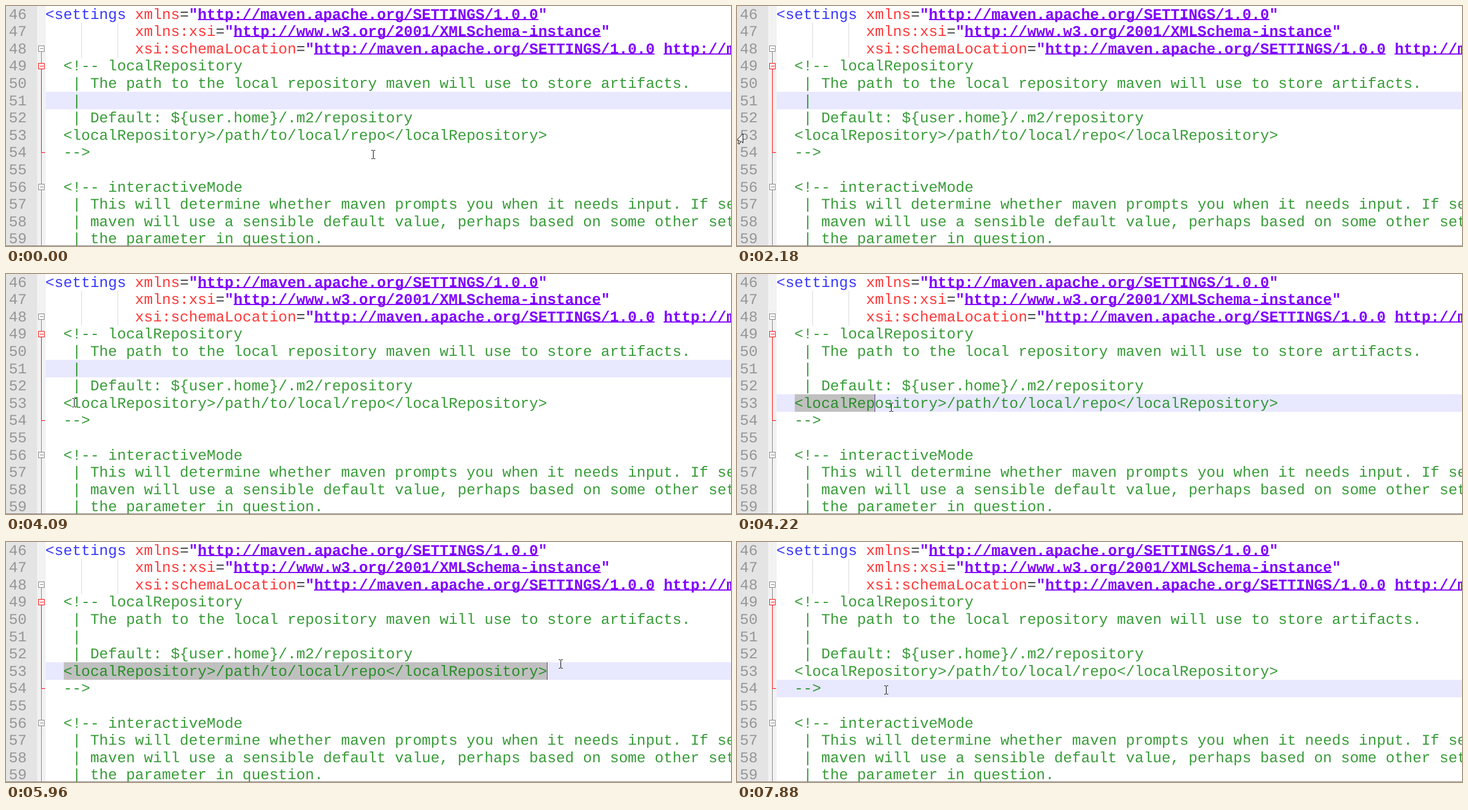
An HTML page for the animation above (8 s loop, 1280 by 425 pixels).

```html
<!DOCTYPE html>
<html lang="en">
<head>
<meta charset="utf-8">
<title>settings.xml</title>
<style>
html, body { margin: 0; width: 100%; height: 100%; overflow: hidden; background: #fff; }
svg { display: block; width: 100%; height: 100%; }
text {
  font: 26.36px "Courier New", "Liberation Mono", monospace;
  white-space: pre;
  text-rendering: geometricPrecision;
  fill-opacity: .78;
}
.num { fill: #808080; }
.tag { fill: #0000ff; }
.attr { fill: #ff0000; }
.op { fill: #000; }
.note { fill: #008000; }
.str, .url { fill: #8000ff; font-weight: bold; fill-opacity: 1; }
rect, .fold { shape-rendering: crispEdges; }
</style>
</head>
<body>
<svg id="stage" viewBox="0 0 1280 425" preserveAspectRatio="none">
  <rect width="1280" height="425" fill="#fff"/>
  <rect width="55" height="425" fill="#e4e4e4"/>
  <rect x="55" width="15" height="425" fill="#f2f2f2"/>
  <rect id="row" x="70" width="1210" height="31" fill="#e8e8ff"/>
  <rect id="sel" x="102" y="213" height="31" fill="#c0c0c0"/>
  <g id="code"></g>
  <rect id="caret" width="1" height="31" fill="#5a28a0"/>
  <rect y="424" width="1280" height="1" fill="#808080"/>
  <path id="beam" fill="none" stroke="#000" d="M-3.5-7.5H-1L0-6.5L1-7.5H3.5M0-7V7M-3.5 7.5H-1L0 6.5L1 7.5H3.5"/>
  <path id="arrow" fill="#fff" stroke="#000" stroke-linejoin="round" d="M0 0V16.5L-3.8 13L-6.4 18.5L-8.8 17.5L-6.4 12H-11.5Z"/>
</svg>
<script>
const LOOP = 8000, X0 = 69.6, STEP = 15.82, TOP = -1, ROW = 30.6, FIRST = 46;
const $ = id => document.getElementById(id);
const colX = col => X0 + col * STEP;
const lineY = line => TOP + (line - FIRST) * ROW;

function set(el, attrs) {
  for (const key in attrs) el.setAttribute(key, attrs[key]);
  return el;
}
function add(tag, attrs, content = "") {
  const el = document.createElementNS("http://www.w3.org/2000/svg", tag);
  el.textContent = content;
  return $("code").appendChild(set(el, attrs));
}

// Leading spaces set the indent; a style name and a bar open each part.
const lines = [
  ["tag|<settings ", "attr|xmlns", "op|=", 'str|"',
    "url|http://maven.apache.org/SETTINGS/1.0.0", 'str|"'],
  ["attr|          xmlns:xsi", "op|=", 'str|"',
    "url|http://www.w3.org/2001/XMLSchema-instance", 'str|"'],
  ["attr|          xsi:schemaLocation", "op|=", 'str|"',
    "url|http://maven.apache.org/SETTINGS/1.0.0", "str| ", "url|http://maven"],
  ["note|  <!-- localRepository"],
  ["note|   | The path to the local repository maven will use to store artifacts."],
  ["note|   |"],
  ["note|   | Default: ${user.home}/.m2/repository"],
  ["note|  <localRepository>/path/to/local/repo</localRepository>"],
  ["note|  -->"],
  [],
  ["note|  <!-- interactiveMode"],
  ["note|   | This will determine whether maven prompts you when it needs input. If set"],
  ["note|   | maven will use a sensible default value, perhaps based on some other setting"],
  ["note|   | the parameter in question."]
];

lines.forEach((parts, i) => {
  const y = lineY(FIRST + i) + 23.5;
  let col = 0;
  add("text", { x: 5, y, class: "num" }, FIRST + i);
  for (const part of parts) {
    const bar = part.indexOf("|");
    const style = part.slice(0, bar), words = part.slice(bar + 1);
    const x = colX(col);
    add("text", { x, y, class: style }, words);
    if (style === "url")
      add("rect", { x, y: Math.round(y), width: words.length * STEP, height: 2, class: "url" });
    col += words.length;
  }
});

// Indent guides and fold margin
const GREY = "#808080", RED = "#ff0000";
const trace = (d, stroke, extra) => add("path", { d, stroke, fill: "none", class: "fold", ...extra });
const foldY = line => Math.floor(lineY(line) + ROW / 2) + 0.5;
function foldBox(line, color) {
  const y = foldY(line);
  add("rect", { x: 57.5, y: y - 5, width: 10, height: 10, fill: "#fff", stroke: color });
  trace(`M60 ${y}H66`, color);
}
for (const col of [4, 8])
  trace(`M${Math.floor(colX(col) + 1) + 0.5} 30V91`, "#b0b0b0", { "stroke-dasharray": "1 1" });
trace(`M62.5 ${foldY(48)}V425`, GREY);
trace(`M62.5 ${foldY(49)}V${foldY(54)}H69`, RED);
foldBox(48, GREY);
foldBox(49, RED);
foldBox(56, GREY);

// The screen refreshes in ticks; the pointer runs straight between these [tick, x, y].
const TICK = 128.7, LEAD = 30;
const PRESS = 33, FULL = 38, CLICK = 56, BLINK = 4;
const path = [
  [0, 648, 263], [2, 278, 257], [7, 100, 225], [10, 30, 222], [17, 10, 226],
  [21, 47, 203], [25, 52, 198], [28, 117, 238], [32, 120, 228], [PRESS, 272, 236],
  [36, 765, 222], [37, 901, 218], [FULL, 974, 219], [49, 981, 215], [50, 742, 253],
  [53, 340, 312], [55, 264, 262], [62, 263, 262]
];

function pointer(k) {
  const next = Math.max(1, path.findIndex(p => p[0] >= k));
  const [a, b] = [path[next - 1], path[next]];
  const f = (k - a[0]) / (b[0] - a[0]);
  return [1, 2].map(i => Math.round(a[i] + (b[i] - a[i]) * f));
}

function caretOn(k) {
  const idle = k - (k >= CLICK ? CLICK : Math.min(k, FULL));
  return k >= PRESS && Math.floor(idle / BLINK) % 2 === 0;
}

const show = (el, on) => set(el, { visibility: on ? "visible" : "hidden" });

function draw(t) {
  const k = Math.floor((t + LEAD) / TICK);
  const [x, y] = pointer(k);
  const line = k < PRESS ? 51 : k < CLICK ? 53 : 54;
  const end = k >= CLICK ? 5 : k >= FULL ? 56 : Math.floor((x - X0) / STEP - 0.8);
  const endX = Math.floor(colX(end)), top = Math.round(lineY(line));

  set($("row"), { y: top });
  set(show($("sel"), line === 53), { width: Math.max(0, endX - 102) });
  set(show($("caret"), caretOn(k)), { x: endX, y: top });

  const inMargin = x < 70;
  show($("arrow"), inMargin);
  show($("beam"), !inMargin);
  set($(inMargin ? "arrow" : "beam"), { transform: `translate(${x + 0.5} ${y})` });
}

const start = performance.now();
function tick() {
  draw((performance.now() - start) % LOOP);
  requestAnimationFrame(tick);
}
tick();
</script>
</body>
</html>
```
